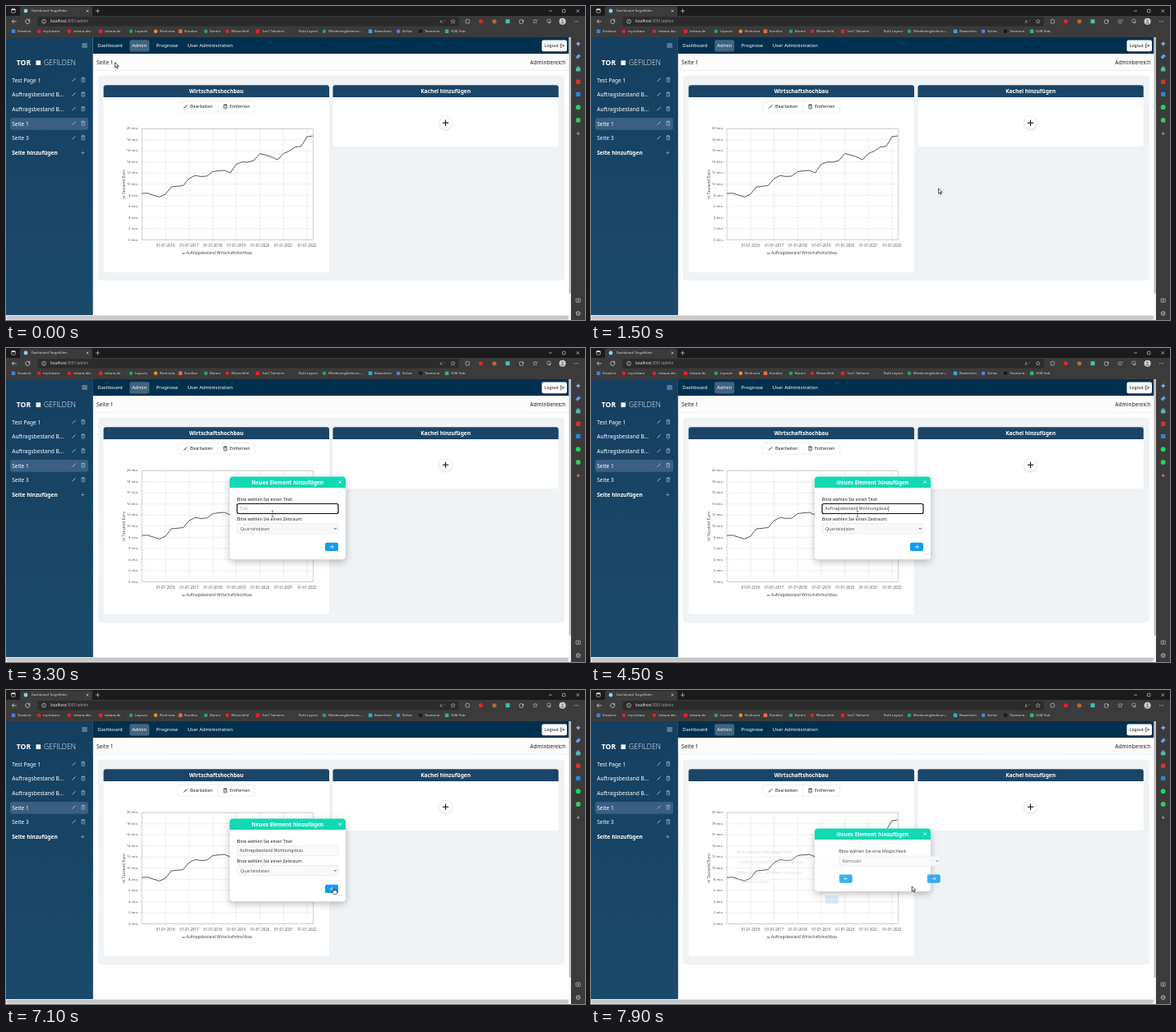
These frames come from a looping animation (704 px wide and 382 px high, 8000 ms). An HTML page with a canvas:

```html
<!DOCTYPE html>
<html lang="de">
<head>
<meta charset="utf-8">
<title>Dashboard</title>
<style>
html, body { margin: 0; width: 100%; height: 100%; overflow: hidden; background: #fff; }
canvas { display: block; width: 704px; height: 382px; }
</style>
</head>
<body>
<canvas id="stage"></canvas>
<script>
const W = 704, H = 382, LOOP = 8000, STEP = 100;
const PAGE = '"Noto Sans", "Open Sans", sans-serif';
const UI = '"Open Sans", "Noto Sans", sans-serif';
const canvas = document.getElementById('stage');
const c = canvas.getContext('2d');
const dpr = window.devicePixelRatio || 1;
canvas.width = W * dpr;
canvas.height = H * dpr;

// Drawing helpers
function rect(x, y, w, h, fill) {
  c.fillStyle = fill;
  c.fillRect(x, y, w, h);
}

function box(x, y, w, h, r, fill, stroke, lw = 0.5) {
  c.beginPath();
  c.roundRect(x, y, w, h, r);
  if (fill) { c.fillStyle = fill; c.fill(); }
  if (stroke) { c.strokeStyle = stroke; c.lineWidth = lw; c.stroke(); }
}

function disc(x, y, r, fill, stroke, lw = 0.6) {
  c.beginPath();
  c.arc(x, y, r, 0, Math.PI * 2);
  if (fill) { c.fillStyle = fill; c.fill(); }
  if (stroke) { c.strokeStyle = stroke; c.lineWidth = lw; c.stroke(); }
}

function line(color, lw, ...p) {
  c.beginPath();
  for (let i = 0; i < p.length; i += 2) c.lineTo(p[i], p[i + 1]);
  c.strokeStyle = color;
  c.lineWidth = lw;
  c.stroke();
}

function text(s, x, y, size, color, { align = 'left', weight = 400, font = PAGE } = {}) {
  c.font = `${weight} ${size}px ${font}`;
  c.textAlign = align;
  c.textBaseline = 'alphabetic';
  c.fillStyle = color;
  c.fillText(s, x, y + size * 0.36);
}

function shadow(color, blur, dy) {
  c.shadowColor = color;
  c.shadowBlur = blur * dpr;
  c.shadowOffsetY = dy * dpr;
}

function plus(x, y, r, color, lw) {
  line(color, lw, x - r, y, x + r, y);
  line(color, lw, x, y - r, x, y + r);
}

function cross(x, y, r, color, lw) {
  line(color, lw, x - r, y - r, x + r, y + r);
  line(color, lw, x - r, y + r, x + r, y - r);
}

function pencil(x, y, color) {
  line(color, 1, x - 1.7, y + 1.7, x + 1.6, y - 1.6);
  line(color, 0.5, x - 2.6, y + 2.6, x - 1.6, y + 1.6);
  line(color, 1, x + 1.9, y - 2.1, x + 2.3, y - 2.4);
}

function bin(x, y, color) {
  line(color, 0.6, x - 2.4, y - 2, x + 2.4, y - 2);
  line(color, 0.6, x - 0.9, y - 2.7, x + 0.9, y - 2.7);
  box(x - 1.8, y - 1.8, 3.6, 4.5, 0.4, null, color, 0.6);
  line(color, 0.4, x - 0.6, y - 0.8, x - 0.6, y + 1.8);
  line(color, 0.4, x + 0.6, y - 0.8, x + 0.6, y + 1.8);
}

function arrow(x, y, r, dir, color, lw) {
  line(color, lw, x - r * dir, y, x + r * dir, y);
  line(color, lw, x + r * dir * 0.1, y - r * 0.8, x + r * dir, y, x + r * dir * 0.1, y + r * 0.8);
}

// Browser frame
const marks = [
  ['Vocalent', 14, '#3b82e0'], ['my.tolvara', 45, '#e5202e'], ['tolvara.dev', 82, '#e5202e'],
  ['tolvara.de', 120, '#e5202e'], ['Layouts', 157, '#23a566'], ['Rechnora', 187, '#ee8d22'],
  ['Kundivo', 217, '#ee6a3c'], ['Buroni', 248, '#23a566'], ['Wissenfeld', 274, '#e5202e'],
  ['1on1 Talmerin', 311, '#e5202e'], ['Rufo Layout', 356, null], ['Wiedereingliederun...', 392, '#23a566'],
  ['Bewerbino', 448, '#37a8d8'], ['Sichta', 482, '#5b7fe0'], ['Teamoria', 509, '#181818'],
  ['VLM Hub', 541, '#2fb86a']
];

function browser() {
  const ui = { font: UI }, ink = '#e6e6e6', grey = '#c4c4c4';
  rect(0, 0, W, 38, '#3b3b3b');
  rect(0, 0, W, 12, '#1b1b1b');
  box(17, 0.5, 88, 13, [2.5, 2.5, 0, 0], '#3b3b3b');
  box(6.7, 3.6, 4.6, 4.6, 0.8, null, ink, 0.6);
  rect(6.7, 3.6, 4.6, 1.5, ink);
  disc(24, 6, 2.4, '#8fd0ee');
  text('Dashboard Torgefilden', 31, 6, 4.1, ink, ui);
  cross(99, 6, 1.5, ink, 0.6);
  plus(111.5, 6, 2.5, ink, 0.6);
  line(ink, 0.6, 660, 6, 664, 6);
  box(676.4, 4.2, 3.6, 3.6, 0.5, null, ink, 0.6);
  cross(695.3, 6, 1.9, ink, 0.6);

  arrow(10, 18.8, 2.8, -1, ink, 0.7);
  c.beginPath();
  c.arc(26.3, 18.8, 2.6, -0.4, 5.2);
  c.strokeStyle = ink; c.lineWidth = 0.7; c.stroke();
  line(ink, 0.7, 28.6, 15.8, 28.6, 17.6, 26.8, 17.6);
  box(38.5, 13.3, 512, 11.2, 2, '#2b2b2b');
  disc(46, 18.8, 2.5, null, ink);
  line(ink, 0.6, 46, 18.4, 46, 20.2);
  rect(45.7, 17.2, 0.6, 0.6, ink);
  text('localhost', 54, 18.8, 4.6, '#fff', ui);
  const w = c.measureText('localhost').width;
  text(':3001/admin', 54 + w, 18.8, 4.6, '#a8a8a8', ui);
  text('A', 529, 18.8, 5, grey, { font: UI, align: 'center' });
  text('»', 532, 17.5, 3, grey, ui);
  const star = (x, y, r, col) => {
    c.beginPath();
    for (let i = 0; i < 10; i++) {
      const a = i * Math.PI / 5 - Math.PI / 2, q = i % 2 ? r * 0.45 : r;
      c.lineTo(x + q * Math.cos(a), y + q * Math.sin(a));
    }
    c.closePath(); c.strokeStyle = col; c.lineWidth = 0.5; c.stroke();
  };
  star(543.5, 18.8, 2.8, grey);
  box(559, 16.6, 4.4, 4.4, 0.8, null, grey, 0.7);
  disc(577.3, 18.8, 2.5, '#e0282e');
  disc(593.8, 18.8, 2.6, '#b8692e');
  rect(607.5, 16.2, 5, 5, '#3cc3b4');
  box(624.4, 16.8, 4.2, 4.4, 0.7, null, grey, 0.7);
  disc(628.6, 18, 0.9, grey);
  star(643.3, 18.8, 2.8, grey);
  line(grey, 0.5, 645.5, 17, 647.2, 17);
  box(658, 16.2, 4, 4, 0.6, null, grey, 0.6);
  plus(661, 20, 1.6, grey, 0.5);
  disc(676.6, 18.8, 4, '#d4d4d4');
  disc(676.6, 17.6, 1.4, '#8e8e8e');
  box(674.4, 19.4, 4.4, 2.2, 1, '#8e8e8e');
  for (let i = -1; i < 2; i++) disc(693.5 + i * 1.9, 18.8, 0.5, ink);

  marks.forEach(([s, x, col], i) => {
    if (col) {
      if (i % 3) disc(x - 5, 30.8, 2.3, col);
      else box(x - 7.2, 28.6, 4.5, 4.5, 0.5, col);
    }
    text(s, x, 30.7, 4.15, ink, ui);
  });

  // Right icon bar
  rect(687, 38, 17, 344, '#3b3b3b');
  const ix = 695.7;
  line('#b9a5ea', 1.4, ix - 2.5, 46, ix + 2.5, 46);
  line('#8fb8f0', 1.4, ix, 43.4, ix, 48.6);
  c.save();
  c.translate(ix, 61.5); c.rotate(-0.78);
  box(-2.8, -1.9, 5.6, 3.8, 1, '#5c9de8');
  c.restore();
  box(ix - 2.8, 75.2, 5.6, 4.2, 0.8, '#4fb7b0');
  box(ix - 1.3, 73.8, 2.6, 1.5, 0.4, null, '#9fd8d2', 0.6);
  box(ix - 2.7, 89.5, 5.4, 5.4, 0.8, '#d0342c');
  box(ix - 2.7, 104.7, 5.4, 5.4, 0.8, '#2b86d8');
  disc(ix, 123.2, 2.9, '#1ed760');
  disc(ix, 138.9, 2.9, '#39c95c');
  plus(ix, 155.2, 2.2, grey, 0.6);
  box(ix - 2.7, 356, 5.4, 4.4, 0.8, null, grey, 0.7);
  plus(ix, 358.2, 1.3, grey, 0.6);
  disc(ix, 374, 2.4, null, grey, 0.9);
  disc(ix, 374, 0.9, null, grey, 0.5);
}

// Page
function sidebar() {
  const g = c.createLinearGradient(0, 38, 0, 376);
  g.addColorStop(0, '#143f60');
  g.addColorStop(1, '#1c4a6c');
  rect(0, 38, 105.7, 338, g);
  for (let i = -1; i < 2; i++) line('#dbe6ee', 0.7, 92.3, 48 + i * 2, 98.8, 48 + i * 2);

  text('TOR', 12.8, 69, 8.6, '#fff', { weight: 700 });
  rect(36.5, 66.3, 5.6, 5.6, '#fff');
  text('GEFILDEN', 46, 69, 8.6, '#fff', { weight: 300, font: UI });

  box(5, 136, 95, 14.8, 3, '#3a5f82');
  ['Test Page 1', 'Auftragsbestand B...', 'Auftragsbestand B...', 'Seite 1', 'Seite 3'].forEach((s, i) => {
    const y = 90.4 + i * 17.6;
    text(s, 7.2, y, 6.6, '#fff');
    pencil(82.6, y - 0.6, '#a9bccb');
    bin(93.8, y - 0.6, '#a9bccb');
  });
  text('Seite hinzufügen', 7.2, 178.4, 6.6, '#fff', { weight: 600 });
  plus(93.3, 178.6, 2.1, '#a9bccb', 0.6);
}

const series = [228, 227.8, 230.2, 232.3, 229, 220, 219.3, 218.5, 210, 206.3, 207.4, 207, 201.5, 200.6, 200,
  203, 192.5, 189.8, 190, 188, 179.5, 181.3, 183.6, 187, 179.5, 176.5, 171.5, 170.8, 159, 158];

function chart() {
  const ink = '#555', x0 = 165.2, x1 = 373.6, y0 = 149.2, dy = 13.52, y1 = y0 + 10 * dy;
  for (let i = 0; i <= 10; i++) {
    const y = y0 + i * dy;
    line('#dcdcdc', 0.5, x0 - 2.5, y, x1, y);
    text(`${20 - 2 * i} mio.`, 161, y - 0.3, 4.15, ink, { align: 'right' });
  }
  for (let i = 0; i < 7; i++) {
    const x = 194.1 + i * 28.66;
    line('#dcdcdc', 0.5, x, y0, x, y1 + 2.5);
    text(`01-01-${2016 + i}`, x, 291.4, 4.4, ink, { align: 'center' });
  }
  c.strokeStyle = '#b4b4b4'; c.lineWidth = 0.6;
  c.strokeRect(x0, y0, x1 - x0, y1 - y0);
  c.lineJoin = 'round';
  line('#222', 0.75, ...series.flatMap((y, i) => [x0 + i * 7.17, y]));
  c.save();
  c.translate(142.8, 217); c.rotate(-Math.PI / 2);
  text('in Tausend Euro', 0, 0, 4.75, ink, { align: 'center' });
  c.restore();
  line('#222', 0.8, 214, 301, 217.6, 301);
  text('Auftragsbestand Wirtschaftshochbau', 219, 300.8, 4.6, '#444');
}

function tile(x, h, title) {
  box(x, 96.2, 274.4, h, 3, '#fff');
  box(x, 96.2, 274.4, 14.8, [3, 3, 0, 0], '#1b4567');
  text(title, x + 137.2, 103.6, 6.55, '#fff', { align: 'center', weight: 600 });
}

function page() {
  rect(105.7, 38, 582, 344, '#fff');
  rect(105.7, 38, 579, 20.3, '#00304f');
  box(150.3, 41.2, 24, 14.2, 2.5, '#42647e');
  [['Dashboard', 111.3], ['Admin', 153.2], ['Prognose', 182.8], ['User Administration', 220.8]]
    .forEach(([s, x]) => text(s, x, 48, 5.87, '#fff'));
  box(651.5, 41.4, 30.5, 13.8, 2, '#fff');
  text('Logout', 654.8, 48.2, 5.1, '#111');
  line('#111', 0.6, 676.2, 46, 674.2, 46, 674.2, 50.4, 676.2, 50.4);
  arrow(676.9, 48.2, 1.8, 1, '#111', 0.6);

  rect(105.7, 58.3, 579, 20, '#fcfcfc');
  line('#e2e2e2', 0.6, 105.7, 78.4, 684.7, 78.4);
  text('Seite 1', 110, 68.4, 6.6, '#222');
  text('Adminbereich', 680.3, 68.4, 6.55, '#222', { align: 'right' });

  box(112, 84.4, 567, 249.5, 4, '#eff3f5');
  tile(118.6, 227.8, 'Wirtschaftshochbau');
  tile(397.4, 74.8, 'Kachel hinzufügen');
  box(209.2, 115.6, 93.4, 13.4, 2, '#fff', '#dcdcdc');
  line('#dcdcdc', 0.5, 257.8, 115.6, 257.8, 129);
  pencil(218.3, 122.3, '#222');
  text('Bearbeiten', 224, 122.3, 5.28, '#222');
  bin(266.6, 122.3, '#222');
  text('Entfernen', 272, 122.3, 5.28, '#222');
  chart();
  c.save();
  shadow('rgba(0,0,0,.18)', 3, 0.6);
  disc(534.4, 142.3, 7.5, '#fff');
  c.restore();
  plus(534.4, 142.2, 3.7, '#111', 1.1);

  rect(684.5, 38, 2.5, 338, '#f4f4f4');
  box(684.7, 38, 2, 312, 1, '#b5b5b5');
  rect(0, 376, 687, 6, '#f1f1f1');
  box(0.5, 376.7, 683.5, 4.7, 2.3, '#c6c6c6');
}

// Dialog
function button(x, y, dir) {
  box(x, y, 16, 10.4, 2.2, '#159cf0');
  arrow(x + 8, y + 5.2, 2.2, dir, '#fff', 0.8);
}

function field(y, focus) {
  box(281, y, 123, 12.2, 2.2, '#f9f9fa', focus || '#dadde1', focus ? 1.1 : 0.5);
}

function select(y, s, focus) {
  if (focus) box(280.4, y - 0.6, 124.2, 13.4, 2.8, null, 'rgba(70,170,240,.3)', 1.4);
  field(y, focus ? '#3aa3ec' : null);
  text(s, 285, y + 6.2, 5.25, '#555');
  line('#222', 0.8, 398.8, y + 5.3, 400.3, y + 6.8, 401.8, y + 5.3);
}

function titleForm(t) {
  const typing = t < 5200, filled = t >= 4500;
  text('Bitte wählen Sie einen Titel:', 280.8, 184, 5.28, '#222');
  field(189.4, null);
  if (typing) box(281, 189.5, 123, 12, 2.2, '#fff', '#111', 1.2);
  const s = filled ? 'Auftragsbestand Wohnungsbau' : 'Titel';
  text(s, 284.3, 195.4, 5.15, filled ? '#444' : '#a5a5a5');
  const w = filled ? c.measureText(s).width + 0.5 : 0;
  const caret = t < 3100 || (t >= 3600 && t < 4100) || (t >= 4500 && t < 5000);
  if (typing && caret) line('#111', 0.5, 284.4 + w, 192.2, 284.4 + w, 198.8);
  text('Bitte wählen Sie einen Zeitraum:', 280.8, 208.2, 5.28, '#222');
  select(213.6, 'Quartalsdaten', t >= 5200 && t < 6500);
  button(388, 236.7, 1);
}

function kindForm() {
  text('Bitte wählen Sie eine Möglichkeit:', 280.5, 196, 5.28, '#222');
  select(202, 'Kennzahl', false);
  button(281, 224.4, -1);
  button(388, 224.4, 1);
}

function layer(dx, dy, alpha, draw) {
  c.save();
  c.translate(dx, dy);
  c.globalAlpha = alpha;
  draw();
  c.restore();
}

function dialog(t) {
  const swap = t >= 7400;
  const y = swap ? 168.5 : 156.5, h = swap ? 76.6 : 100.7;
  c.save();
  shadow('rgba(0,0,0,.25)', 9, 3);
  box(272, y, 141, h, 4, '#fff');
  c.restore();
  box(272, y, 141, 13.4, [4, 4, 0, 0], '#12d9b4');
  text('Neues Element hinzufügen', 342.3, y + 6.7, 6.5, '#fff', { align: 'center', weight: 600 });
  cross(406.2, y + 6.7, 1.7, '#fff', 0.8);
  if (!swap) return titleForm(t);
  const p = Math.min(1, Math.max(0, (t - 7410) / 670));
  const e = (1 - Math.cos(Math.PI * p)) / 2;
  layer(-124 * e, 13.4, 1 - e, () => titleForm(t));
  layer(124 * (1 - e), 0, e, kindForm);
}

// Pointer: time, x, y
const track = [
  [0, 132.6, 68.6], [900, 289, 221], [1300, 370, 228.5], [1500, 422.6, 222], [1800, 502, 192],
  [2300, 531.5, 145.8], [2700, 531.5, 145.8], [3100, 324, 201.5], [4700, 324, 201.5],
  [5200, 323.2, 218], [6700, 323.2, 218], [7100, 396.2, 241], [7500, 396.2, 241], [7900, 390.2, 238.8]
];

function pointerAt(t) {
  let i = 0;
  while (i < track.length - 2 && t >= track[i + 1][0]) i++;
  const a = track[i], b = track[i + 1];
  const k = Math.min(1, (t - a[0]) / (b[0] - a[0]));
  const slope = (j, n) => {
    if (j < 1 || j > 4) return null;
    return (track[j + 1][n] - track[j - 1][n]) / (track[j + 1][0] - track[j - 1][0]);
  };
  return [1, 2].map(n => {
    const d = b[n] - a[n], span = b[0] - a[0];
    if (i > 4) return a[n] + d * k * k * (3 - 2 * k);
    const m0 = (slope(i, n) ?? d / span) * span;
    const m1 = (slope(i + 1, n) ?? 0) * span;
    const k2 = k * k, k3 = k2 * k;
    return a[n] + d * (3 * k2 - 2 * k3) + m0 * (k3 - 2 * k2 + k) + m1 * (k3 - k2);
  });
}

const arrowPath = new Path2D('M0 0V16L3.7 12.5L6.2 18.3L8.8 17.2L6.3 11.5H11.5Z');
const handPath = new Path2D('M4 1.5C4-.5 7-.5 7 1.5V7C8-.0 8 6 10 7C11 6 13 6.5 13 8C14.5 7.4 16 8 16 9.5V14C16 17 14 19 11 19H8C5 19 3 15 1 12C0 10 2 9 4 11Z');

function pointer(t) {
  const [x, y] = pointerAt(t);
  if (t >= 3100 && t <= 4800) {
    line('#333', 0.6, x, y - 3.2, x, y + 3.8);
    line('#333', 0.6, x - 1.3, y - 3.4, x + 1.3, y - 3.4);
    line('#333', 0.6, x - 1.3, y + 4, x + 1.3, y + 4);
    return;
  }
  const hand = (t >= 2100 && t < 2800) || (t >= 7100 && t < 7400);
  const shape = hand ? handPath : arrowPath;
  c.save();
  c.translate(x, y);
  c.scale(0.4, 0.4);
  c.lineWidth = 1.8;
  c.strokeStyle = '#111';
  c.fillStyle = '#fff';
  c.fill(shape);
  c.stroke(shape);
  c.restore();
}

function draw(t) {
  c.setTransform(dpr, 0, 0, dpr, 0, 0);
  page();
  sidebar();
  browser();
  if (t >= 2500) dialog(t);
  pointer(t);
}

let last = -1;
const start = performance.now();
function tick() {
  const t = Math.floor(((performance.now() - start) % LOOP) / STEP) * STEP;
  if (t !== last) draw(last = t);
  requestAnimationFrame(tick);
}
tick();
</script>
</body>
</html>
```
